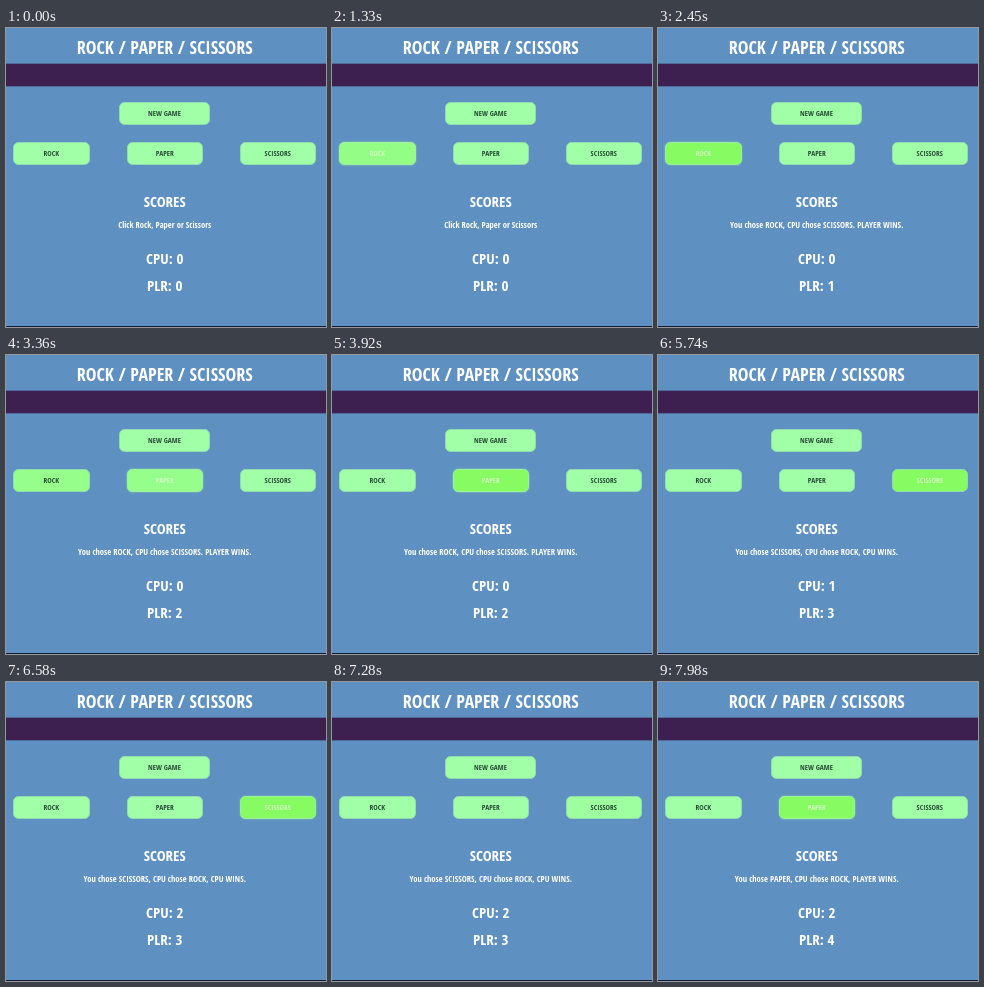
An HTML page that plays this animation: 320x299 px, repeating every 8000 ms.

```html
<!DOCTYPE html>
<html lang="en">
<head>
<meta charset="utf-8">
<title>Rock / Paper / Scissors</title>
<style>
html, body { margin: 0; width: 100%; height: 100%; overflow: hidden; background: #5e91c1; }
body {
  position: relative; color: #fff;
  font: 300 15px "Open Sans Condensed", "Roboto Condensed", Roboto, sans-serif;
  font-stretch: 75%;
}
.line { position: absolute; left: 0; width: 317.5px; text-align: center; white-space: pre; line-height: 20px; }
#title { top: 9px; font-size: 18px; }
#band { position: absolute; top: 36px; width: 320px; height: 22px; background: #3e2050; box-shadow: 0 0 0 1px rgba(62, 32, 80, .35); }
#foot { position: absolute; top: 298px; width: 320px; height: 1px; background: #141d38; }
#heading { top: 163px; }
#msg { top: 187px; font-size: 8.5px; }
#cpu { top: 220px; }
#plr { top: 247px; }
.btn {
  position: absolute; top: 113.5px; width: 76.5px; height: 23.5px; box-sizing: border-box;
  border: 1.5px solid #8fdcae; border-radius: 5.5px; background: #a1ffa8; color: #294c38;
  font-size: 7.5px; line-height: 21px; text-align: center;
}
#new { left: 113px; top: 73.5px; width: 91px; }
#rock { left: 7px; }
#paper { left: 120.5px; }
#scissors { left: 233.5px; }
</style>
</head>
<body>
<div id="title" class="line">ROCK / PAPER / SCISSORS</div>
<div id="band"></div>
<div id="new" class="btn">NEW GAME</div>
<div id="rock" class="btn">ROCK</div>
<div id="paper" class="btn">PAPER</div>
<div id="scissors" class="btn">SCISSORS</div>
<div id="heading" class="line">SCORES</div>
<div id="msg" class="line"></div>
<div id="cpu" class="line"></div>
<div id="plr" class="line"></div>
<div id="foot"></div>
<script>
const LOOP = 8000;
const $ = id => document.getElementById(id);

// [button, pointer in, pointer out, presses]
const hovers = [
  ['rock', 1050, 3080, [2170]],
  ['paper', 3120, 4690, [3920]],
  ['scissors', 4690, 6860, [5670, 6300]],
  ['paper', 7320, 9000, []]
];

const won = (you, cpu, end) => `You chose ${you}, CPU chose ${cpu}${end} WINS.`;
const rockWin = won('ROCK', 'SCISSORS', '. PLAYER');
const paperWin = won('PAPER', 'ROCK', ', PLAYER');
const rockBeats = won('SCISSORS', 'ROCK', ', CPU');

// [time, message, cpu, player]
const rounds = [
  [0, 'Click Rock, Paper or Scissors', 0, 0],
  [2170, rockWin, 0, 1],
  [2730, rockWin, 0, 2],
  [4340, paperWin, 0, 3],
  [5390, rockBeats, 1, 3],
  [6300, rockBeats, 2, 3],
  [7700, paperWin, 2, 4]
];

const clamp = x => Math.max(0, Math.min(1, x));
const mix = (a, b, k) => `rgb(${a.map((v, i) => Math.round(v + (b[i] - v) * k))})`;
const pulse = (t, from, to, rise, fall) =>
  clamp((t - from) / rise) * (1 - clamp((t - to) / fall));

function paint(id, fill, ink, glow) {
  const s = $(id).style;
  s.background = mix([161, 255, 168], [135, 252, 98], fill);
  s.borderColor = mix([143, 220, 174], [158, 242, 158], glow);
  s.color = mix([41, 76, 56], [207, 255, 190], ink);
  s.boxShadow = `0 0 2px rgba(165, 250, 165, ${glow * .75})`;
}

function write(id, text) {
  if ($(id).textContent !== text) $(id).textContent = text;
}

function frame() {
  const t = performance.now() % LOOP;
  for (const id of ['rock', 'paper', 'scissors']) {
    let fill = 0, ink = 0, glow = 0;
    for (const [name, from, to, presses] of hovers) {
      if (name !== id) continue;
      fill += pulse(t, from, to, 560, 480);
      ink += pulse(t, from, to, 70, 70);
      let g = pulse(t, from, to, 70, 70);
      for (const p of presses) g *= 1 - pulse(t, p, p + 140, 60, 180);
      glow += g;
    }
    paint(id, fill, ink, glow);
  }
  const [, msg, cpu, plr] = rounds.filter(r => r[0] <= t).pop();
  write('msg', msg);
  write('cpu', 'CPU: ' + cpu);
  write('plr', 'PLR: ' + plr);
  requestAnimationFrame(frame);
}
frame();
</script>
</body>
</html>
```
